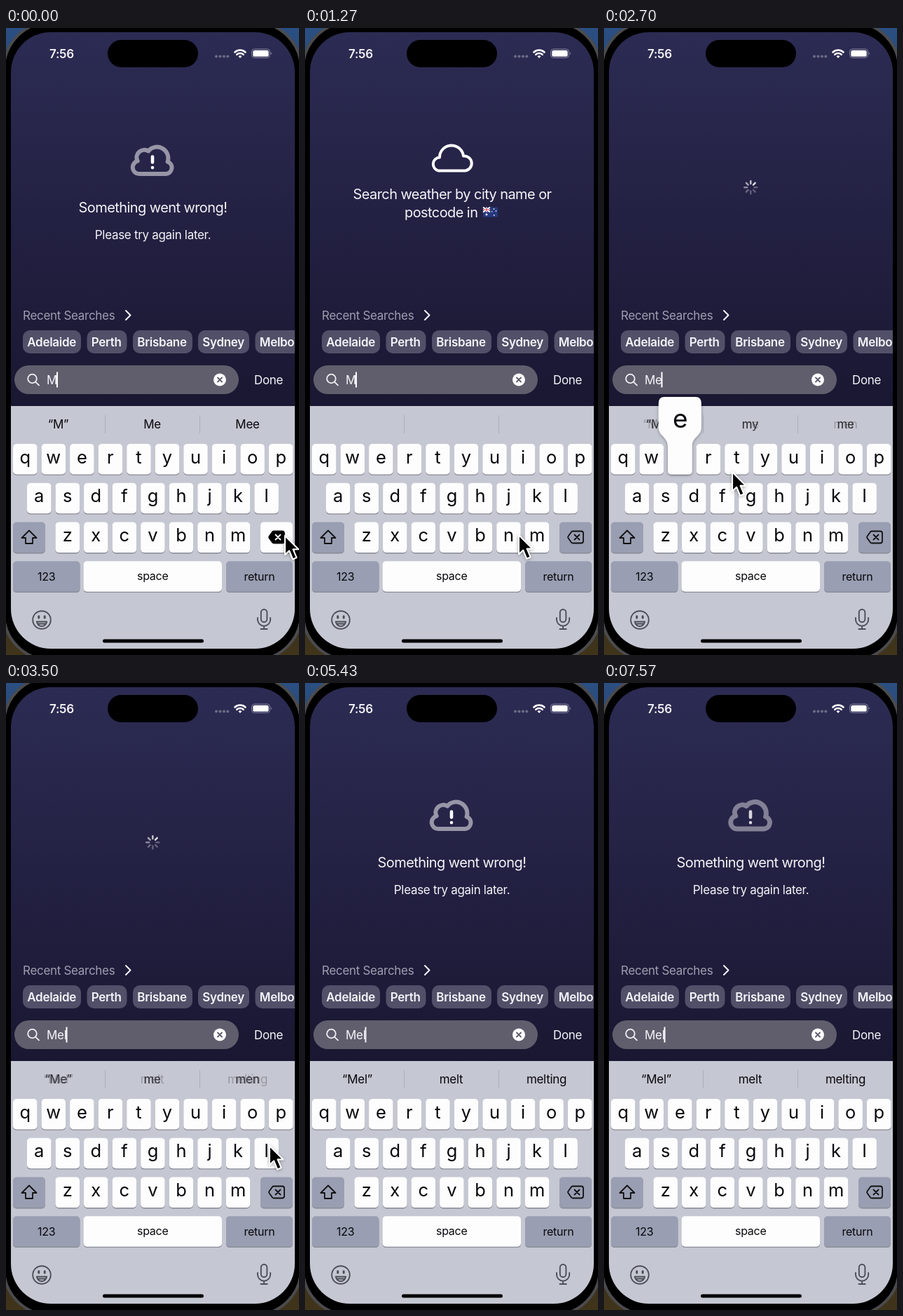
An HTML page that plays this animation: 418x894 px, repeating every 7610 ms.

```html
<!DOCTYPE html>
<html lang="en">
<head>
<meta charset="utf-8">
<title>Weather search</title>
<style>
html, body { margin: 0; width: 100%; height: 100%; overflow: hidden; background: #000; }
svg { display: block; width: 418px; height: 894px; }
text { font: 17px Inter, "Open Sans", sans-serif; letter-spacing: -.018em; font-optical-sizing: none; fill: #f4f4f8; white-space: pre; }
.title { font-size: 20px; letter-spacing: -.029em; }
.bold { font-weight: 600; }
.mid { text-anchor: middle; }
.key { font-size: 25.5px; letter-spacing: 0; }
.small { font-size: 16px; }
#keyboard text { fill: #08080c; }
.line { fill: none; stroke-linecap: round; stroke-linejoin: round; }
</style>
</head>
<body>
<svg viewBox="0 0 418 894">
  <defs>
    <linearGradient id="desk" x2="0" y2="1"><stop stop-color="#2b4f82"/><stop offset=".5" stop-color="#1b2430"/><stop offset="1" stop-color="#40341a"/></linearGradient>
    <linearGradient id="night" gradientUnits="userSpaceOnUse" x1="0" y1="6" x2="0" y2="539"><stop stop-color="#2c2b53"/><stop offset="1" stop-color="#1a1732"/></linearGradient>
    <clipPath id="screen"><rect x="7" y="6" width="405" height="879" rx="57"/></clipPath>
    <filter id="shade" x="-30%" y="-30%" width="160%" height="160%"><feDropShadow dx="0" dy="1" stdDeviation="2" flood-opacity=".35"/></filter>
  </defs>
  <rect width="418" height="894" fill="url(#desk)"/>
  <rect x="-3" y="-8" width="424" height="909" rx="66" stroke="#4b4b4e" stroke-width="4"/>
  <g clip-path="url(#screen)">
    <rect x="7" y="6" width="405" height="540" fill="url(#night)"/>

    <text class="bold" x="62" y="42.5">7:56</text>
    <rect x="145" y="17" width="129" height="39" rx="19.5"/>
    <g fill="#6c6b85"><circle cx="300" cy="40.5" r="2"/><circle cx="305.5" cy="40.5" r="2"/><circle cx="311" cy="40.5" r="2"/><circle cx="316.3" cy="40.5" r="2"/></g>
    <g class="line" stroke="#fff" stroke-width="2.6" stroke-linecap="butt">
      <path d="M326.5 34.5a11 11 0 0 1 15 0M329.3 37.8a7 7 0 0 1 9.4 0"/>
    </g>
    <path d="M331.5 40.3a4 4 0 0 1 5 0L334 43z" fill="#fff"/>
    <rect x="350.5" y="30" width="26" height="12.5" rx="4" fill="none" stroke="#8583a0"/>
    <rect x="352.3" y="31.8" width="22.4" height="9" rx="2.6" fill="#fff"/>
    <path d="M378 34.2q2.2 2 0 4z" fill="#8583a0"/>

    <g id="intro">
      <path class="line" stroke="#fff" stroke-width="4" d="M190.5 203.5H228.5A10.5 10.5 0 0 0 226 182.6A17.05 17.05 0 0 0 192 184.5A9.6 9.6 0 0 0 190.5 203.5Z"/>
      <text class="title mid" x="210" y="244">Search weather by city name or</text>
      <text class="title" x="142" y="270">postcode in</text>
      <g transform="translate(254 255.5)">
        <rect width="21" height="14" rx="1.5" fill="#27387f"/>
        <path d="M0 0L10 7M10 0L0 7M5 0V7M0 3.5H10" stroke="#fff" stroke-width="1.9"/>
        <path d="M5 0V7M0 3.5H10" stroke="#d2364a"/>
        <g fill="#fff"><circle cx="5" cy="10.5" r="1.4"/><circle cx="15.5" cy="2.6" r=".9"/><circle cx="18.5" cy="5.4" r=".8"/><circle cx="12.8" cy="6.3" r=".8"/><circle cx="15.8" cy="11.4" r=".9"/></g>
      </g>
    </g>

    <g id="error">
      <g id="warning">
        <path id="cloud" class="line" stroke="#fff" d="M190 208H228.4A9 9 0 0 0 230.6 190.6A16 16 0 0 0 203 175.5A10.8 10.8 0 0 0 187.7 189.7A9.3 9.3 0 0 0 190 208Z"/>
        <path class="line" stroke="#fff" stroke-width="4.6" d="M209 183.5V191.5M209 199V199.1"/>
      </g>
      <text class="title mid" x="209.5" y="263">Something went wrong!</text>
      <text class="mid" x="209.5" y="301">Please try again later.</text>
    </g>

    <g id="spinner" class="line" stroke="#fff" stroke-width="2.5"></g>

    <text x="24" y="416" style="fill:#9f9db0">Recent Searches</text>
    <path class="line" stroke="#f4f4f8" stroke-width="2" d="M171 403l6.5 6.5L171 416"/>
    <g id="chips"></g>

    <rect x="12" y="481" width="320" height="41" rx="20.5" fill="#605e6d"/>
    <g class="line" stroke="#f0f0f4" stroke-width="1.8"><circle cx="37.5" cy="500" r="6.3"/><path d="M42.3 504.8L47 509.3"/></g>
    <text id="query" x="58" y="508"></text>
    <rect id="caret" y="490.5" width="2" height="22" fill="#fff"/>
    <g id="clear"><circle cx="305" cy="501.5" r="9" fill="#fff"/><path class="line" stroke="#5a5868" stroke-width="1.8" d="M302 498.5l6 6m0-6l-6 6"/></g>
    <text x="354" y="508">Done</text>

    <g id="keyboard">
      <rect x="7" y="539" width="405" height="350" fill="#c5c7d2"/>
      <path d="M141.5 552V578M276.5 552V578" stroke="#adb0be"/>
      <g id="before"></g><g id="after"></g>
      <g id="keys"></g>
      <path class="line" stroke="#111" stroke-width="1.8" d="M33 716.5L43.5 727H38V735H28V727H22.5Z"/>
      <g class="line" stroke="#111" stroke-width="1.8">
        <path id="erase" d="M382 717.5H394Q397 717.5 397 720.5V731.5Q397 734.5 394 734.5H382Q381 734.5 380 733.6L375.5 727.2Q374.7 726 375.5 724.8L380 718.4Q381 717.5 382 717.5Z"/>
        <path id="eraseX" d="M384.5 722.5l7 7m0-7l-7 7"/>
      </g>
      <g class="line" stroke="#4c4e58" stroke-width="1.9">
        <circle cx="51" cy="844" r="12.8"/>
        <path d="M43.8 846.5H58.2Q56.5 853 51 853T43.8 846.5ZM45 849.5H57"/>
        <path d="M46.8 838.8V841M55.2 838.8V841" stroke-width="3"/>
        <rect x="363.8" y="829" width="8.6" height="18" rx="4.3"/>
        <path d="M359 841V843.5A9.1 9.1 0 0 0 377.2 843.5V841M368.1 853V857M363.5 857H372.7"/>
      </g>
      <rect x="138" y="871.5" width="144" height="5" rx="2.5"/>
      <g id="popup"><path fill="#fdfdfe" filter="url(#shade)" d="M-22 -67H22Q30.5 -67 30.5 -58V-24C30.5 -11 17.3 -10 17.3 3V38.5Q17.3 43.5 12.3 43.5H-12.3Q-17.3 43.5 -17.3 38.5V3C-17.3 -10 -30.5 -11 -30.5 -24V-58Q-30.5 -67 -22 -67Z"/><text class="mid" y="-23" style="font-size:37px"></text></g>
    </g>
  </g>
  <path id="pointer" stroke="#fff" stroke-width="2" stroke-linejoin="round" filter="url(#shade)" d="M0 0V27L6.2 21.3L11.2 33.5L16.6 31.2L11.5 19.3H19.3Z"/>
</svg>
<script>
const LOOP = 7610;
const $ = id => document.getElementById(id);
const clamp = x => Math.max(0, Math.min(1, x));
const ease = x => x * x * (3 - 2 * x);
const show = (el, on) => el.setAttribute('display', on ? 'inline' : 'none');

function add(parent, tag, attrs, label) {
  const el = document.createElementNS('http://www.w3.org/2000/svg', tag);
  for (const name in attrs) el.setAttribute(name, attrs[name]);
  if (label) el.textContent = label;
  return parent.appendChild(el);
}

function addKey(x, y, width, fill) {
  add($('keys'), 'rect', { x, y: y + 1.3, width, height: 43.5, rx: 5, fill: '#888a95' });
  return add($('keys'), 'rect', { x, y, width, height: 43.5, rx: 5, fill });
}

const GREY = '#999eb2', WHITE = '#fdfdfe';
const keyAt = {};
[['qwertyuiop', 10], ['asdfghjkl', 30], ['zxcvbnm', 70.5]].forEach(([letters, left], row) => {
  [...letters].forEach((letter, i) => {
    const x = left + i * 40.55, y = 593 + row * 55.8;
    addKey(x, y, 34.5, WHITE);
    add($('keys'), 'text', { x: x + 17.25, y: y + 27.5, class: 'key mid' }, letter);
    keyAt[letter] = [x + 17.25, y];
  });
});
addKey(10, 704.6, 46, GREY);
const eraseKey = addKey(363, 704.6, 46, GREY);
[[10, 95.5, GREY, '123', 787.5], [110.5, 197.5, WHITE, 'space', 786.5], [314, 95, GREY, 'return', 787.5]]
  .forEach(([x, width, fill, label, y]) => {
    addKey(x, 760.3, width, fill);
    add($('keys'), 'text', { x: x + width / 2, y, class: 'small mid' }, label);
  });

[['Adelaide', 24, 83], ['Perth', 115.5, 57], ['Brisbane', 181, 85], ['Sydney', 274, 73], ['Melbourne', 355.5, 100]]
  .forEach(([city, x, width]) => {
    add($('chips'), 'rect', { x, y: 431, width, height: 33, rx: 10, fill: '#524f69' });
    add($('chips'), 'text', { x: x + 6.3, y: 454, class: 'bold' }, city);
  });

const spokes = [...Array(8).keys()].map(i =>
  add($('spinner'), 'path', { d: 'M0 -5.2V-9', transform: `translate(209.3 227.3) rotate(${i * 45})` }));

const suggestionSlots = ['before', 'after'].map(id =>
  [74.5, 208.5, 344.5].map(x => add($(id), 'text', { x, y: 571, class: 'mid' })));

// start time, typed text, caret x
const typing = [[0, 'M', 72], [260, '', 58], [1230, 'M', 72], [2590, 'Me', 81.5], [3440, 'Mel', 85.5]];
const suggestions = [
  [-300, ['“M”', 'Me', 'Mee']],
  [280, ['', '', '']],
  [1320, ['“M”', 'my', 'me']],
  [2660, ['“Me”', 'me', 'men']],
  [3460, ['“Mel”', 'melt', 'melting']],
];
const views = [[0, 'error'], [320, 'intro'], [1500, 'spinner'], [4900, 'error']];
const presses = [[1110, 1240, 'm'], [2570, 2740, 'e'], [3380, 3480, 'l']];
const pointerPath = [
  [0, 398, 724], [450, 398, 724], [1000, 331, 724], [1190, 331, 724], [1370, 270, 722],
  [2200, 110, 614], [2600, 110, 614], [2800, 254, 652], [3150, 376, 660], [4600, 376, 660], [4850, 425, 690],
];

const latest = (list, t) => list.findLastIndex(item => item[0] <= t);

function drawPointer(t) {
  const i = latest(pointerPath, t), from = pointerPath[i], to = pointerPath[i + 1];
  show($('pointer'), !!to);
  if (!to) return;
  const p = ease((t - from[0]) / (to[0] - from[0]));
  const at = k => from[k] + (to[k] - from[k]) * p;
  $('pointer').setAttribute('transform', `translate(${at(1)} ${at(2)})`);
}

function drawSuggestions(t) {
  const i = latest(suggestions, t), mix = clamp((t - suggestions[i][0]) / 170);
  const sets = [suggestions[Math.max(0, i - 1)][1], suggestions[i][1]];
  sets.forEach((words, s) => words.forEach((word, k) => { suggestionSlots[s][k].textContent = word; }));
  $('before').setAttribute('opacity', 1 - mix);
  $('after').setAttribute('opacity', mix);
}

function drawField(t) {
  const [start, query, caretX] = typing[latest(typing, t)];
  $('query').textContent = query;
  show($('clear'), query !== '');
  const phase = (t - start) % 1000;
  const lit = phase < 500 ? 1 : Math.max(1 - (phase - 500) / 150, (phase - 900) / 100);
  $('caret').setAttribute('x', caretX);
  $('caret').setAttribute('opacity', clamp(lit));
}

function drawView(t) {
  const view = views[latest(views, t)][1];
  for (const id of ['intro', 'error', 'spinner']) show($(id), id === view);
  const since = t < 1000 ? t : t - 5430;
  const dim = .3 * (1 - Math.cos(since / 1800 * 2 * Math.PI));
  $('warning').setAttribute('opacity', 1 - dim);
  $('cloud').setAttribute('stroke-opacity', .52);
  $('cloud').setAttribute('stroke-width', 6 + Math.min(1.2, dim * 5));
  const head = Math.floor(t / 100) - 2;
  spokes.forEach((spoke, i) => {
    const age = (head - i + 16 * 8) % 8;
    spoke.setAttribute('opacity', Math.max(.28, .85 - age * .13));
  });
}

function drawKeys(t) {
  const erasing = t < 240;
  eraseKey.setAttribute('fill', erasing ? WHITE : GREY);
  $('erase').setAttribute('fill', erasing ? '#000' : 'none');
  $('eraseX').setAttribute('stroke', erasing ? '#fff' : '#111');
  const press = presses.find(([from, to]) => t >= from && t < to);
  show($('popup'), !!press);
  if (press) {
    $('popup').setAttribute('transform', `translate(${keyAt[press[2]]})`);
    $('popup').lastElementChild.textContent = press[2];
  }
}

const origin = performance.now();
function frame() {
  const t = (performance.now() - origin) % LOOP;
  drawView(t);
  drawField(t);
  drawSuggestions(t);
  drawKeys(t);
  drawPointer(t);
  requestAnimationFrame(frame);
}
frame();
</script>
</body>
</html>
```
